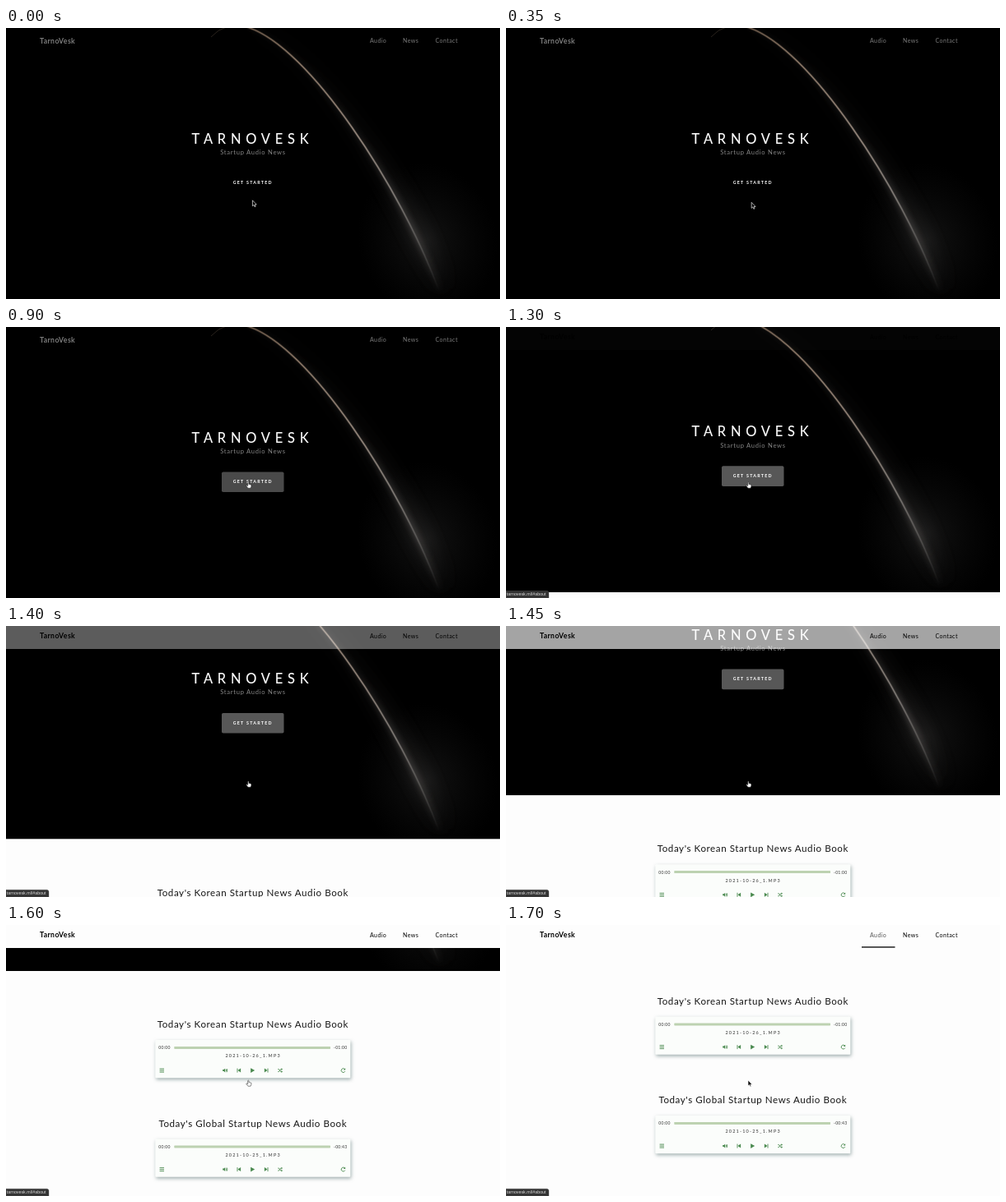
These frames come from a looping animation (600 by 330 pixels, 1.95 s). An HTML page:

```html
<!DOCTYPE html>
<html lang="en">
<head>
<meta charset="utf-8">
<title>TarnoVesk</title>
<style>
  html, body { margin: 0; width: 100%; height: 100%; overflow: hidden; background: #000; }
  svg { display: block; width: 100%; height: 100%; }
  text { font-family: Lato, "Open Sans", sans-serif; white-space: pre; }
  .title { font-size: 16.4px; letter-spacing: 5.8px; fill: #fff; stroke: #fff; stroke-width: .15; stroke-linejoin: round; }
  .sub { font-size: 7.6px; letter-spacing: .72px; fill: #858585; }
  .cta { font-size: 5.3px; font-weight: 700; letter-spacing: 1.27px; fill: #fff; }
  .logo { font-size: 8.7px; font-weight: 700; letter-spacing: .4px; }
  .link { font-size: 7px; letter-spacing: .42px; }
  .head { font-size: 11.6px; letter-spacing: .57px; fill: #161616; text-anchor: middle; }
  .time { font-size: 5px; letter-spacing: .3px; fill: #333; }
  .file { font-size: 5.5px; letter-spacing: 1.2px; fill: #333; }
  .status { font: 5.3px "Liberation Sans", Arial, sans-serif; fill: #dcdcdc; }
  .card { filter: drop-shadow(1.5px 2px 2px rgba(70, 100, 100, .5)); }
  .line { fill: none; stroke: #4a8a4f; stroke-width: .9; }
  .solid { fill: #4a8a4f; }
</style>
</head>
<body>
<svg viewBox="0 0 600 330" preserveAspectRatio="none">
  <defs>
    <linearGradient id="rim" gradientUnits="userSpaceOnUse" x1="0" y1="0" x2="0" y2="320">
      <stop offset="0" stop-color="#6e5b4b"/>
      <stop offset=".12" stop-color="#8c7867"/>
      <stop offset=".4" stop-color="#93857a"/>
      <stop offset=".65" stop-color="#85807b" stop-opacity=".9"/>
      <stop offset=".85" stop-color="#6c6a68" stop-opacity=".45"/>
      <stop offset="1" stop-color="#555" stop-opacity="0"/>
    </linearGradient>
    <linearGradient id="haze" gradientUnits="userSpaceOnUse" x1="0" y1="0" x2="0" y2="325">
      <stop offset="0" stop-color="#777370" stop-opacity=".04"/>
      <stop offset=".4" stop-color="#777370" stop-opacity=".14"/>
      <stop offset=".78" stop-color="#777370" stop-opacity=".36"/>
      <stop offset="1" stop-color="#777370" stop-opacity="0"/>
    </linearGradient>
    <radialGradient id="glow">
      <stop offset="0" stop-color="#555" stop-opacity=".22"/>
      <stop offset=".5" stop-color="#444" stop-opacity=".11"/>
      <stop offset="1" stop-color="#333" stop-opacity="0"/>
    </radialGradient>
    <filter id="soft" filterUnits="userSpaceOnUse" x="200" y="-40" width="400" height="400"><feGaussianBlur stdDeviation="3"/></filter>
    <filter id="wide" filterUnits="userSpaceOnUse" x="200" y="-40" width="400" height="400"><feGaussianBlur stdDeviation="11"/></filter>
    <clipPath id="heroBox"><rect width="600" height="330"/></clipPath>
    <path id="arc" d="M293 -1C368 22 480 195 526 320"/>
  </defs>

  <rect width="600" height="330" fill="#fdfdfd"/>
  <g id="page">
    <g clip-path="url(#heroBox)">
      <rect width="600" height="330"/>
      <ellipse cx="512" cy="258" rx="84" ry="95" fill="url(#glow)" transform="rotate(-18 512 258)"/>
      <g fill="none">
        <use href="#arc" x="5" stroke="url(#haze)" stroke-width="15" opacity=".6" filter="url(#wide)"/>
        <use href="#arc" x="1" stroke="url(#haze)" stroke-width="7" filter="url(#soft)"/>
        <path d="M249 11Q266 -8 293 -1" stroke="#4a3d33" stroke-width=".8" opacity=".7"/>
        <use href="#arc" stroke="url(#rim)" stroke-width="3" opacity=".28"/>
        <use href="#arc" stroke="url(#rim)" stroke-width="1.4"/>
      </g>
      <text class="title" x="225.6" y="140.5">TARNOVESK</text>
      <text class="sub" x="260.2" y="153.8">Startup Audio News</text>
      <rect id="button" x="262" y="176.4" width="75.5" height="24.6" rx="1.8" fill="#fff"/>
      <text class="cta" x="275.7" y="190.2">GET STARTED</text>
    </g>
    <g id="players"></g>
  </g>

  <rect id="bar" width="600" height="28" fill="#fdfdfd"/>
  <g id="nav">
    <text class="logo" x="41" y="18.9">TarnoVesk</text>
    <text class="link" id="audio" x="442" y="18.4">Audio</text>
    <text class="link" x="482" y="18.4">News</text>
    <text class="link" x="521.6" y="18.4">Contact</text>
  </g>
  <rect id="underline" x="432" y="26.2" width="40.5" height="1.5" fill="#222"/>

  <g id="status">
    <path d="M0 321.3H49.5Q52 321.3 52 323.8V330H0Z" fill="#333" stroke="#555" stroke-width=".4"/>
    <text class="status" x=".8" y="327.4">tarnovesk.ml/#about</text>
  </g>

  <path id="arrow" d="M0 0V7L1.6 5.6L2.7 8L3.8 7.5L2.8 5.2H4.9Z" stroke="#fff" stroke-width=".65"/>
  <path id="hand" d="M-.6 .6Q0 -.4 .6 .6V2.6Q1.3 2.1 1.7 2.8Q2.4 2.4 2.7 3.1Q3.6 2.9 3.6 3.9V5.2L2.8 7.2H-.4L-2.4 4.6Q-2.5 3.6 -1.5 3.9L-.6 4.6Z"
    fill="#fff" stroke="#111" stroke-width=".5"/>
</svg>
<script>
const LOOP = 1950, STEP = 50, SCROLL = 302.5;
const $ = id => document.getElementById(id);
const clamp = v => Math.min(1, Math.max(0, v));
const ramp = (t, start, length) => clamp((t - start) / length);
const show = (id, on) => $(id).setAttribute('visibility', on ? 'visible' : 'hidden');
const place = (id, x, y) => $(id).setAttribute('transform', `translate(${x} ${y})`);

// CSS ease-in-out: cubic-bezier(.42, 0, .58, 1), solved by bisection
function ease(x) {
  let low = 0, high = 1, s = .5;
  for (let i = 0; i < 20; i++) {
    const at = 1.26 * s * (1 - s) ** 2 + 1.74 * s * s * (1 - s) + s ** 3;
    if (at < x) low = s; else high = s;
    s = (low + high) / 2;
  }
  return s * s * (3 - 2 * s);
}

const skip = '<path class="line" d="M-2 -2.5V2.5"/><path class="solid" d="M2.1 -2.5V2.5L-1.5 0Z"/>';
const icons = [
  [189.3, '<path class="line" d="M-2.7 -2H2.7M-2.7 0H2.7M-2.7 2H2.7"/>'],
  [266, '<path class="solid" d="M-2.8 -1H-1.5L.2 -2.4V2.4L-1.5 1H-2.8Z"/><path class="line" d="M1.1 -1.2Q1.9 0 1.1 1.2M2.1 -2.1Q3.4 0 2.1 2.1"/>'],
  [283, skip],
  [299.4, '<path class="solid" d="M-2.3 -2.9L2.8 0L-2.3 2.9Z"/>'],
  [316, `<g transform="scale(-1 1)">${skip}</g>`],
  [333, '<path class="line" d="M-2.7 -1.5H-1.5L.7 1.5H2M-2.7 1.5H-1.5L.7 -1.5H2"/><path class="solid" d="M1.5 -2.8L3 -1.5L1.5 -.2ZM1.5 2.8L3 1.5L1.5 .2Z"/>'],
  [409.6, '<path class="line" d="M1.7 -1.7A2.4 2.4 0 1 0 2.2 1"/><path class="solid" d="M2.6 -2.9V-.5H.2Z"/>']
];

const player = (y, region, file, left) => `<g transform="translate(0 ${y})">
  <text class="head" x="299.8" y="96.7">Today's ${region} Startup News Audio Book</text>
  <rect class="card" x="181.3" y="111.5" width="237" height="46.3" rx="1" fill="#fbfdfb"/>
  <rect x="204.3" y="119.4" width="189.7" height="3" rx=".6" fill="#bdd2b1"/>
  <text class="time" x="185.3" y="122.8">00:00</text>
  <text class="time" x="398" y="122.8">-${left}</text>
  <text class="file" x="266.4" y="132.9">${file}</text>
  ${icons.map(([x, art]) => `<g transform="translate(${x} 148.6)">${art}</g>`).join('')}
</g>`;
$('players').innerHTML = player(SCROLL, 'Korean', '2021-10-26_1.MP3', '01:00')
  + player(SCROLL + 120.5, 'Global', '2021-10-25_1.MP3', '00:43');

// time, x, y of the pointer tip
const route = [[300, 299.4, 209.8], [500, 294.5, 220], [600, 292.6, 217.2], [700, 293, 207], [850, 294, 189]];

function pointer(t) {
  if (t <= route[0][0]) return route[0].slice(1);
  for (let i = 1; i < route.length; i++) {
    const [t0, x0, y0] = route[i - 1], [t1, x1, y1] = route[i];
    if (t <= t1) {
      const k = (t - t0) / (t1 - t0);
      return [x0 + (x1 - x0) * k, y0 + (y1 - y0) * k];
    }
  }
  return route[route.length - 1].slice(1);
}

function draw(t) {
  place('page', 0, -SCROLL * ease(ramp(t, 1252, 443)));
  $('button').setAttribute('fill-opacity', .29 * ramp(t, 740, 160) + .05 * ramp(t, 950, 50));

  const shrink = ramp(t, 1230, 70), grey = Math.round(124 * (1 - shrink));
  const active = t >= 1650, ink = `rgb(${grey},${grey},${grey})`;
  $('bar').setAttribute('fill-opacity', ease(ramp(t, 1274, 300)));
  place('nav', 0, -3.4 * shrink);
  $('nav').setAttribute('fill', ink);
  $('audio').setAttribute('fill', active ? '#555' : ink);
  show('underline', active);
  show('status', t >= 1150);

  const [x, y] = pointer(t), hand = y < 201 && t < 1700;
  show('hand', hand);
  show('arrow', !hand);
  place('hand', x + .3, y);
  place('arrow', x, y);
}

const begin = performance.now();
function tick() {
  const t = (performance.now() - begin) % LOOP;
  draw(Math.floor(t / STEP) * STEP);
  requestAnimationFrame(tick);
}
tick();
</script>
</body>
</html>
```
